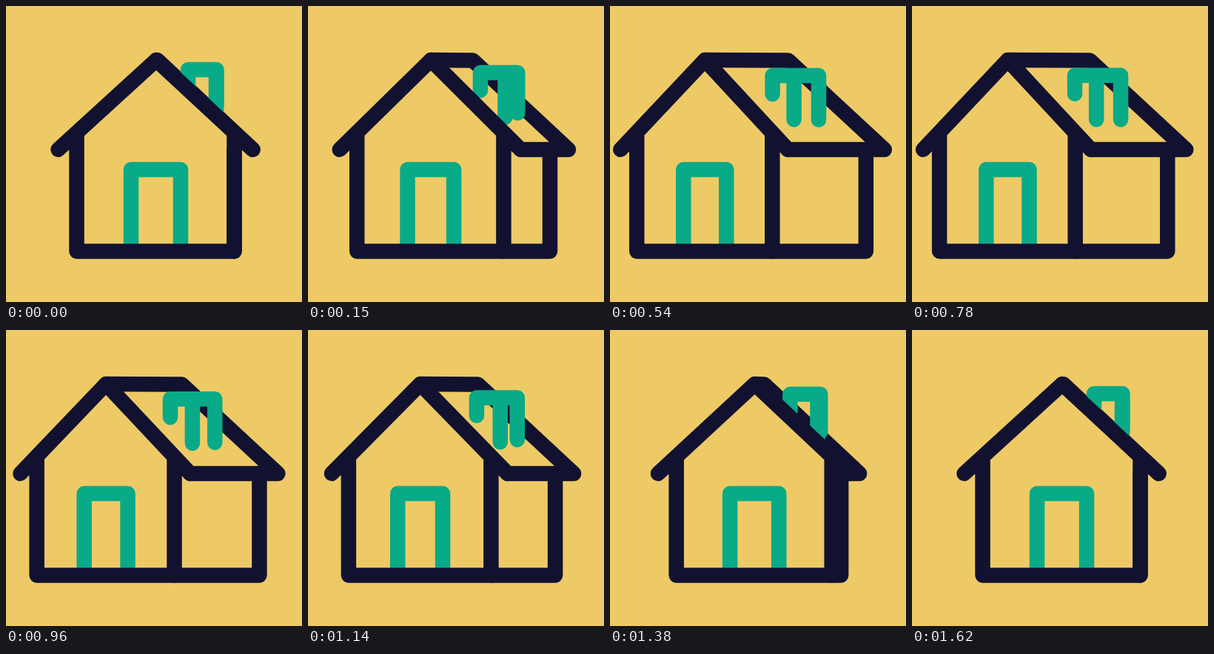
These frames come from a looping animation (400x400 px, 3650 ms). An HTML page:

```html
<!DOCTYPE html>
<html lang="en">
<head>
<meta charset="utf-8">
<title>Turning house</title>
<style>
  html, body { margin: 0; width: 100%; height: 100%; overflow: hidden; background: #edca66; }
  svg { display: block; width: 100%; height: 100%; }
  path { fill: none; stroke-width: 20.5; stroke-linecap: round; stroke-linejoin: round; }
  .navy { stroke: #121230; }
  .green { stroke: #08aa88; }
</style>
</head>
<body>
<svg viewBox="0 0 400 400">
  <path id="side" class="navy"/>
  <path id="chimney" class="green"/>
  <path id="door" class="green"/>
  <path id="front" class="navy"/>
</svg>
<script>
const LOOP = 3650, STEP = 30, OPEN_END = 600, CLOSE_END = 1620;
const TOP = 73, EAVE = 194, BASE = 331.5, WALL = 175;

// Each value runs from the front view to the fully turned view.
const RANGE = {
  apex: [203, 128], ridge: [205, 241],
  eaveL: [70.5, 14], eaveM: [333.5, 240], eaveR: [333.5, 371],
  wallL: [95.5, 36], wallM: [308.5, 219], wallR: [308.5, 346],
  doorL: [169, 99], doorR: [236, 157],
  chimL: [246, 219.5], chimM: [284, 248.5], chimR: [284.5, 282],
  chimTop: [86, 94], endL: [109, 119], endM: [147, 153.6], endR: [136, 153.8]
};

const parts = {};
for (const el of document.querySelectorAll('path')) parts[el.id] = el;

// Cubic Bezier easing with flat tangents at both ends.
function ease(u, x1, x2) {
  let lo = 0, hi = 1;
  for (let i = 0; i < 30; i++) {
    const s = (lo + hi) / 2, r = 1 - s;
    const x = 3 * s * r * r * x1 + 3 * s * s * r * x2 + s * s * s;
    if (x < u) lo = s; else hi = s;
  }
  return lo * lo * (3 - 2 * lo);
}

function turnAt(t) {
  if (t <= 0 || t >= CLOSE_END) return 0;
  if (t < OPEN_END) return ease(t / OPEN_END, 0.33, 0.01);
  return 1 - ease((t - OPEN_END) / (CLOSE_END - OPEN_END), 0.82, 0.44);
}

const line = (...pts) => 'M' + pts.map(([x, y]) => x.toFixed(2) + ' ' + y.toFixed(2)).join('L');

function draw(turn) {
  const v = {};
  for (const key in RANGE) {
    const [a, b] = RANGE[key];
    v[key] = a + (b - a) * turn;
  }
  const set = (id, ...lines) => parts[id].setAttribute('d', lines.join(''));

  set('side',
    line([v.apex, TOP], [v.ridge, TOP + 0.4], [v.eaveR, EAVE], [v.eaveM, EAVE]),
    line([v.wallR, EAVE], [v.wallR, BASE], [v.wallM, BASE]));
  set('chimney',
    line([v.chimL, v.endL], [v.chimL, v.chimTop], [v.chimR, v.chimTop], [v.chimR, v.endR]),
    line([v.chimM, v.chimTop], [v.chimM, v.endM]));
  set('door',
    line([v.doorL, BASE - 5], [v.doorL, 221], [v.doorR, 221], [v.doorR, BASE - 5]));
  set('front',
    line([v.eaveL, EAVE], [v.apex, TOP], [v.eaveM, EAVE]),
    line([v.wallL, WALL], [v.wallL, BASE], [v.wallM, BASE], [v.wallM, WALL]));
}

const start = performance.now();
function tick() {
  const t = (performance.now() - start) % LOOP;
  draw(turnAt(Math.floor(t / STEP) * STEP));
  requestAnimationFrame(tick);
}
tick();
</script>
</body>
</html>
```
